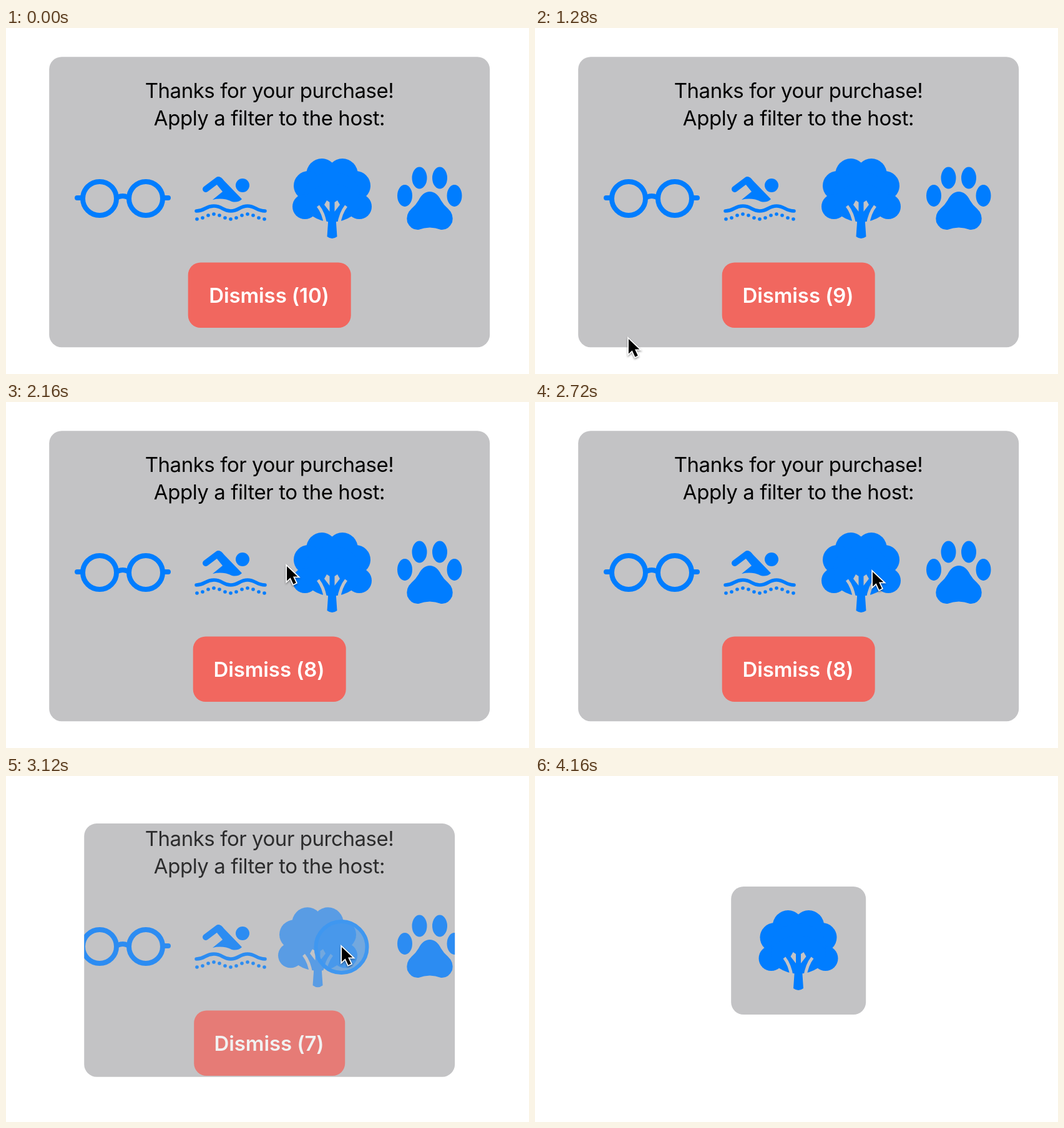
An HTML page that plays this animation: 838x554 px, repeating every 4800 ms.

```html
<!DOCTYPE html>
<html lang="en">
<head>
<meta charset="utf-8">
<style>
  html, body { margin: 0; height: 100%; overflow: hidden; background: #fff; }
  svg { display: block; width: 838px; height: 554px; }
  text { font-family: Inter, sans-serif; font-size: 33px; text-anchor: middle; }
  .title { letter-spacing: -.45px; }
  .label { fill: #fff; font-weight: 600; letter-spacing: -.1px; }
  .icon { fill: #007dff; }
  .line { fill: none; stroke: #007dff; stroke-linecap: round; stroke-linejoin: round; }
  #cursor { filter: drop-shadow(0 2px 2px #0006); }
</style>
</head>
<body>
<svg viewBox="0 0 838 554">
  <defs>
    <clipPath id="clip"><rect class="frame" rx="20"/></clipPath>
    <mask id="gaps" maskUnits="userSpaceOnUse" x="450" y="200" width="146" height="146">
      <path fill="#fff" d="M450 200h146v146H450z"/>
      <g id="gap">
        <path d="M500 285Q509 296 512 316" fill="none" stroke="#000" stroke-width="5"/>
        <path d="M510 283L514 276 518.5 279V294Z"/>
      </g>
      <use href="#gap" transform="matrix(-1 0 0 1 1045 0)"/>
    </mask>
    <g id="tree" class="icon">
      <g mask="url(#gaps)">
        <g id="lobes">
          <ellipse cx="506" cy="235" rx="25" ry="26"/>
          <circle cx="484.5" cy="252.500" r="23.500"/>
          <circle cx="479" cy="286" r="20"/>
        </g>
        <use href="#lobes" transform="matrix(-1 0 0 1 1045 0)"/>
        <ellipse cx="522.5" cy="265" rx="44" ry="35"/>
        <ellipse cx="522.5" cy="280" rx="44" ry="30.500"/>
      </g>
      <path d="M514.500 334L516 312V298H529V312L530.500 334Q522.500 340 514.500 334Z"/>
    </g>
  </defs>

  <rect class="frame" rx="20" fill="#c3c3c5"/>
  <g clip-path="url(#clip)">
    <g id="content">
      <text class="title" x="422" y="111.500">Thanks for your purchase!</text>
      <text class="title" x="422" y="155.500">Apply a filter to the host:</text>

      <g class="line" stroke-width="8">
        <circle cx="150" cy="273" r="27"/>
        <circle cx="224" cy="273" r="27"/>
        <path d="M179 271Q187 267 195 271"/>
        <path d="M114 272h6M254 272h6"/>
      </g>

      <g class="icon">
        <circle cx="379" cy="252" r="11"/>
        <path d="M340 238Q345 238 349 244L378 274Q372 280 362 278Q348 271 331 275L347 262 338 251Z"/>
        <g id="dots"></g>
      </g>
      <path class="line" stroke-width="10" d="M320 258L340 243"/>
      <path class="line" stroke-width="5.500" d="M305 293c14 0 14-8 28-8s14 8 27 8 14-8 27-8 14 8 28 8"/>

      <g class="icon">
        <ellipse cx="639" cy="268.500" rx="12" ry="17.500"/>
        <ellipse cx="662.500" cy="240" rx="12" ry="17.500"/>
        <ellipse cx="695" cy="240" rx="12" ry="17.500"/>
        <ellipse cx="718.500" cy="268.500" rx="12" ry="17.500"/>
        <path d="M679 262Q690 262 697 276Q701 283 708 289Q718 298 715 311Q709 324 697 323Q679 316 661 323Q649 324 643 311Q640 298 650 289Q657 283 661 276Q668 262 679 262Z"/>
      </g>

      <rect id="button" y="375.500" height="104.500" rx="20" fill="#f1675f"/>
      <text id="label" class="label" x="421.5" y="440"></text>
    </g>
    <use id="pick" href="#tree"/>
  </g>

  <circle id="ring" cx="537.500" cy="274" fill="#3f97f0" fill-opacity=".6" stroke="#3f97f0" stroke-width="6"/>
  <path id="cursor" d="M0 0V27l6.500-6 5.500 12 5-2.500-5.500-11.500h8.500z" stroke="#fff" stroke-width="4" paint-order="stroke"/>
</svg>

<script>
const LOOP = 4800, STEP = 80;
const $ = id => document.getElementById(id);
const set = (el, attrs) => { for (const k in attrs) el.setAttribute(k, attrs[k]); };
const clamp = v => Math.min(1, Math.max(0, v));
const mix = (a, b, p) => a + (b - a) * p;

// Pointer stops: time, x, y
const path = [
  [1200, 150, 498], [1280, 150, 498], [1360, 134, 447], [1440, 134, 360],
  [1520, 160, 285], [1680, 340, 248], [1920, 685, 271], [2160, 450, 263],
  [2320, 190, 235], [2400, 123, 165], [2480, 190, 97], [2720, 541, 272],
  [3120, 538, 274], [3600, 538, 274], [3920, 563, 360], [4160, 563, 360]
];
const buttonWidth = { 10: 261, 9: 245, 8: 245, 7: 242 };

for (let x = 306; x <= 414; x += 9) {
  const dot = document.createElementNS('http://www.w3.org/2000/svg', 'circle');
  set(dot, { cx: x, cy: 302 + 4 * Math.cos((x - 306) / 54 * 2 * Math.PI), r: 2.8 });
  $('dots').append(dot);
}

function pointerAt(t) {
  const i = path.findIndex(stop => stop[0] > t);
  if (i < 1) return null;
  const [a, b] = [path[i - 1], path[i]];
  const p = (t - a[0]) / (b[0] - a[0]);
  return [mix(a[1], b[1], p), mix(a[2], b[2], p)];
}

function draw(t) {
  const shrink = (1 - Math.cos(Math.PI * clamp((t - 3020) / 315))) / 2;
  const width = mix(706, 216, shrink), height = mix(465, 205, shrink);
  for (const frame of document.querySelectorAll('.frame'))
    set(frame, { x: 422.2 - width / 2, y: mix(278.7, 279.5, shrink) - height / 2, width, height });

  $('content').style.opacity = 1 - shrink;
  set($('pick'), {
    transform: `translate(${-100.5 * shrink} ${6 * shrink})`,
    opacity: Math.max(1 - 2 * shrink, shrink)
  });

  const count = 10 - Math.max(0, Math.floor((Math.min(t, 3100) - 80) / 1000));
  const w = buttonWidth[count];
  set($('button'), { x: 422.2 - w / 2, width: w });
  $('label').textContent = `Dismiss (${count})`;

  set($('ring'), {
    r: mix(41, 38.5, clamp((t - 3120) / 160)),
    opacity: t < 3040 ? 0 : t < 3120 ? .6 : clamp(1 - (t - 3120) / 420)
  });

  const pointer = pointerAt(t);
  set($('cursor'), pointer
    ? { transform: `translate(${pointer}) scale(.87)`, visibility: 'visible' }
    : { visibility: 'hidden' });
}

const start = performance.now();
function tick() {
  const t = (performance.now() - start) % LOOP;
  draw(Math.floor(t / STEP) * STEP);
  requestAnimationFrame(tick);
}
tick();
</script>
</body>
</html>
```
